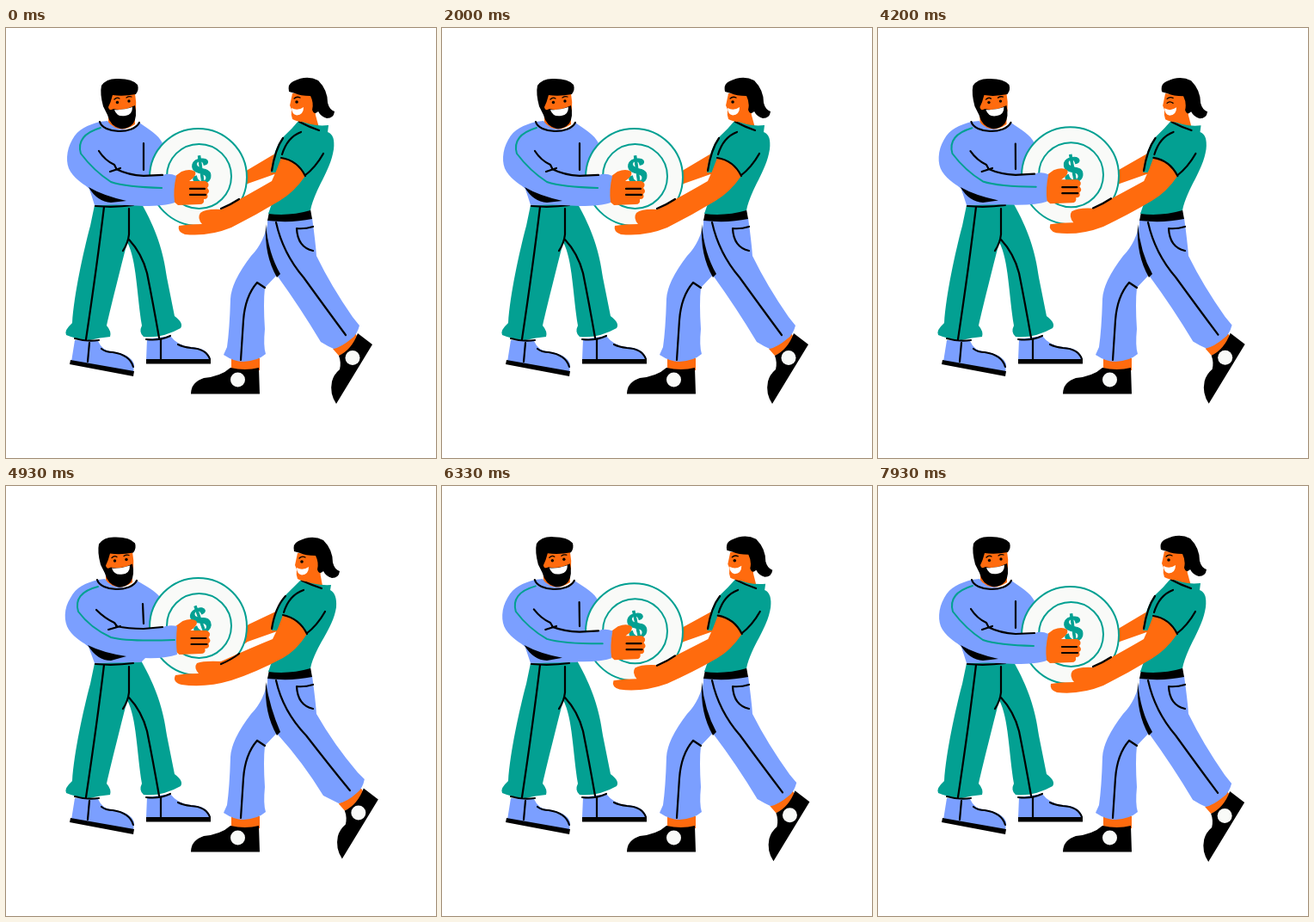
Write an HTML page that moves like this. It is 500 px wide and 500 px high and loops after 7990 ms.

```html
<!DOCTYPE html>
<html lang="en">
<head>
<meta charset="utf-8">
<title>Sharing a coin</title>
<style>
  html, body { margin: 0; width: 100%; height: 100%; overflow: hidden; background: #fff; }
  svg { display: block; width: 100vw; height: 100vh; }
  .blue { fill: #7b9fff; }
  .teal { fill: #03a092; }
  .skin { fill: #ff6b0e; }
  .ink { fill: #000; }
  .pale { fill: #f9faf8; }
  .line { fill: none; stroke: #000; stroke-width: 2.2; stroke-linecap: round; stroke-linejoin: round; }
  .thin { stroke-width: 1.3; }
  .stripe { fill: none; stroke: #03a092; stroke-width: 2; stroke-linecap: round; }
  .dollar { fill: #03a092; stroke: #03a092; stroke-width: 1; font: bold 45px "Noto Serif", "Liberation Serif", serif; text-anchor: middle; }
</style>
</head>
<body>
<!-- In data attributes "a>b" is a value that swings from a to b. -->
<svg viewBox="0 0 500 500">
  <g id="man-legs">
    <path class="blue" d="M80 363L107 364Q112 375 122 376Q145 379 149 391L148 401L76 388Z"/>
    <path class="ink" d="M75 386L149 399L148 405L74 391Z"/>
    <path class="line" d="M97 366L95 388M111 373Q116 377 124 377Q144 380 148 394"/>
    <path class="blue" d="M164 362L191 358Q200 370 215 371Q235 372 238 386L163 386Z"/>
    <path class="ink" d="M163 385H238V390.500H163Z"/>
    <path class="line" d="M180 362V386M200 368Q206 371 215 372Q233 373 237 385"/>
    <path class="teal" d="M103 206L157 203C175 235 183 260 187 290L196 335Q207 343 203 349Q182 361 160 359Q154 354 158 346C152 310 152 270 141 249C133 280 123 320 117 346Q123 353 121 359Q109 360 97 363Q82 362 70 357Q67 352 77 343C79 310 90 260 98 230Z"/>
    <path class="line" d="M114 208Q106 275 93 362M143 210L143 240Q142 250 136 259M143 246Q158 262 164 285Q171 320 178 360M80 361Q94 365 108 363M163 362Q178 364 191 358"/>
  </g>

  <g id="man-body">
    <path class="skin" data-d="M119>116 98H150>147V112Q132>129 124 119>116 111Z"/>
    <path class="blue" data-d="M109>107 109C95>92 113 84>82 117 77>75 130C70>67 142 69>67 158 75>73 167C82>80 178 92>91 182 97>96 187L103 206L157 205L172 190L168 165L182 134C177 124 168 119 155>152 110Q152>149 117 140>137 118Q124>121 118 118>115 108Z"/>
    <path class="line" data-d="M109>106 109C113>110 123 148>145 124 155>152 110M160>159 134>137L160 165>160M104 207Q126 209 148 206"/>
  </g>

  <g id="man-head" data-t="translate(0>-3 0>0.5)">
    <path class="skin" d="M117 82L122 76H150Q152 86 151 97L121 102Q115 95 117 82Z"/>
    <path class="ink" d="M113 91Q109 76 111 67Q117 58 131 59Q147 59 153 66Q155 72 151 77Q136 80 124 78Q122 86 119 92Q120 97 125 94Q136 97 150 90Q153 103 148 111Q142 118 133 117Q121 114 118 101Z"/>
    <path fill="#fff" d="M126 95Q136 96 147 92Q147 101 139 102Q129 104 126 95Z"/>
    <path class="line thin" d="M126 83Q129 80 132 82M140 81Q143 79 146 80"/>
    <g id="man-open" class="ink"><circle cx="129.500" cy="86.500" r="1.700"/><circle cx="143" cy="85" r="1.700"/></g>
    <path id="man-shut" class="line thin" d="M126 87Q129 84 133 87M140 86Q143 83 146 85"/>
  </g>

  <path class="skin" data-d="M318>320 143L281>282 165>161L268 174L268 190L281 181L318 168Z"/>

  <g id="coin" data-t="translate(0 0>-10)">
    <circle class="pale" cx="223.500" cy="173.500" r="56.500" stroke="#03a092" stroke-width="2"/>
    <circle class="stripe" cx="224.500" cy="172.500" r="37.500"/>
    <text class="dollar" x="0" y="16" data-t="translate(227>226 167) rotate(-8>-20)">$</text>
  </g>

  <g id="man-arm">
    <g data-t="translate(0>1.500 0>-10)">
      <path class="skin" d="M193 175L204 167Q214 163 220 167Q222 172 213 178L232 178Q238 181 234 186Q238 190 234 193Q236 199 230 199Q231 205 225 205L200 206L193 200Z"/>
      <path class="line" d="M214 187H231M214 194H232"/>
    </g>
    <path class="blue" data-d="M110 160L128 165>163Q142 171>166 160 172>166L182 171>164Q190 168>161 198>199 172>163Q194>197 188>180 196>199 203>196Q185 207>201 160 207>200Q130 206>201 103 202L96 185Z"/>
    <path class="stripe" data-d="M110>107 116>117C90>87 122 83>80 132 87>84 146Q102>98 166>165 122 179>176Q140 185>181 181>196 186>179"/>
    <path class="line" data-d="M108>105 143>144Q115 154 126 159L128>129 163M121>119 167L133 163M128 164>163Q142 171>166 160 172>166L182 171>164"/>
    <path class="ink" data-d="M96>95 185Q113 195>194 140 201>198L122 203Q106 202>203 96>95 185Z"/>
  </g>

  <g id="woman-back-leg">
    <path class="skin" d="M262 384H295V398H262Z"/>
    <path class="ink" d="M261 395Q278 399 294 395L295 425.500H215Q215 412 230 407Q250 405 261 395Z"/>
    <circle class="pale" cx="269.500" cy="409" r="8.500"/>
    <path class="blue" d="M305 224Q300 250 285 265Q262 295 261 315Q260 350 257 371L253 380Q265 388 276 388Q293 387 302 379Q299 370 301 350Q299 320 301 302L318 284L312 224Z"/>
    <path class="line" d="M301 302L292 296Q278 312 276 340L273 386"/>
  </g>

  <g id="woman-front-leg" data-lead="0">
    <g data-t="translate(0>7 0>-3.500)">
      <path class="skin" d="M380 373L406 355L410 361Q402 376 387 381Z"/>
      <path class="ink" d="M387 381Q402 374 409 355L426 368L384 437Q376 425 379 411Q381 403 388 397Q390 389 387 381Z"/>
      <circle class="pale" cx="403" cy="383.500" r="8.500"/>
    </g>
    <path class="blue" data-d="M304 223L356 221Q360 250 361 265Q378>381 300 403>409 336>333L411>417 346>341Q408>415 357>352 402>408 361>357Q390>397 371>367 381>387 373>369Q374>379 370>365 366>369 365>360Q342>346 325>322 316 289Q303 260 304 223Z"/>
    <path class="ink" data-d="M302 228Q305>307 262>258 319 286L315 290Q300 264 302 228Z"/>
    <path class="line" data-d="M314 226Q322 262 346>349 290Q372>377 326 395>400 357>354M357 231Q347 234 338 233Q339 255 357 259"/>
  </g>

  <g id="woman-body">
    <path class="ink" d="M306 214L354 211L356 222Q332 227 304 224Z"/>
    <path class="skin" data-d="M336>341 98>100H359>365L364>368 116L342>345 113Z"/>
    <path class="teal" data-d="M341>343 107>109Q356>359 115>116 375>378 113>115L374>377 121Q383>385 124>125 381>384 141C377>380 167 360 185 354 212Q330 219 305 216Q314 192 317 168L308>309 168Q311>313 140 322>325 127Q332>334 118 341>343 107>109Z"/>
    <path class="line" data-d="M343>346 121Q327>329 127 321>323 147M347>349 172Q360>362 162 369>371 146M341>344 109>110Q352>355 115 364>367 119M322>325 128Q313 141 309 166"/>
    <path class="skin" data-d="M320>322 151>150Q339>341 154 348>350 172Q335>338 191 318>322 201>200Q290 218>217 262 232>226Q235>232 243>235 208>204 240>231Q199>193 237>228 201>197 230>220Q212>208 228>218 228>224 228>218Q222>218 221>211 226>222 215>206Q233>230 210>203 250 211>204Q285 192>188 309>310 178Q315>317 165 320>322 151>150Z"/>
    <path class="line" data-d="M320>322 151>150Q339>341 154 348>350 172M250 210>207Q262 205>202 271 199>195"/>
  </g>

  <g id="woman-head" data-t="translate(0>6 0>2)">
    <path class="skin" d="M333 76L356 77L361 95L357 108Q341 111 333 106Q331 101 332 95L330 90Z"/>
    <path class="ink" d="M329 74Q327 65 334 62Q350 54 363 61Q374 72 374 87Q376 95 382 97Q381 105 373 105Q366 103 363 97Q358 102 356 95Q358 87 354 79Q342 79 336 76Z"/>
    <path fill="#fff" d="M332 93Q339 97 346 92Q346 101 338 101.500Q332 100 332 93Z"/>
    <path class="line thin" d="M335 82Q338 79 342 81"/>
    <circle id="woman-open" class="ink" cx="338" cy="86" r="1.800"/>
    <path id="woman-shut" class="line thin" d="M335 87Q338 84 342 87"/>
  </g>
</svg>
<script>
  const LOOP = 7990, SWAY = 2000, BLINK = 4000, LEAD = 150;

  const sway = t => (1 - Math.cos(2 * Math.PI * t / SWAY)) / 2;

  // The upper bodies run ahead of the stepping leg and linger at both ends.
  function linger(t) {
    const p = sway(t + LEAD);
    return p * p * (3 - 2 * p);
  }

  const moving = [...document.querySelectorAll('[data-d], [data-t]')].flatMap(el => {
    const pace = el.closest('[data-lead="0"]') ? sway : linger;
    return [['d', el.dataset.d], ['transform', el.dataset.t]]
      .filter(([, text]) => text)
      .map(([name, text]) => ({ el, name, text, pace }));
  });

  function blend(text, p) {
    return text.replace(/(-?[\d.]+)>(-?[\d.]+)/g, (_, a, b) => (+a + (b - a) * p).toFixed(2));
  }

  function show(id, on) {
    document.getElementById(id).style.visibility = on ? 'visible' : 'hidden';
  }

  function setEyes(who, shut) {
    show(who + '-shut', shut);
    show(who + '-open', !shut);
  }

  // Uneven ticks: alternately 130 ms and 70 ms.
  function tick(ms) {
    const pair = Math.floor(ms / 200) * 200;
    return ms - pair < 130 ? pair : pair + 100;
  }

  let last = -1;
  function draw(now) {
    const t = tick(now % LOOP);
    if (t === last) return;
    last = t;
    for (const { el, name, text, pace } of moving) {
      el.setAttribute(name, blend(text, pace(t)));
    }
    const b = t % BLINK;
    setEyes('man', b >= 1000 && b <= 1200);
    setEyes('woman', b >= 100 && b <= 300);
  }

  const start = performance.now();
  function loop() {
    draw(performance.now() - start);
    requestAnimationFrame(loop);
  }
  loop();
</script>
</body>
</html>
```
